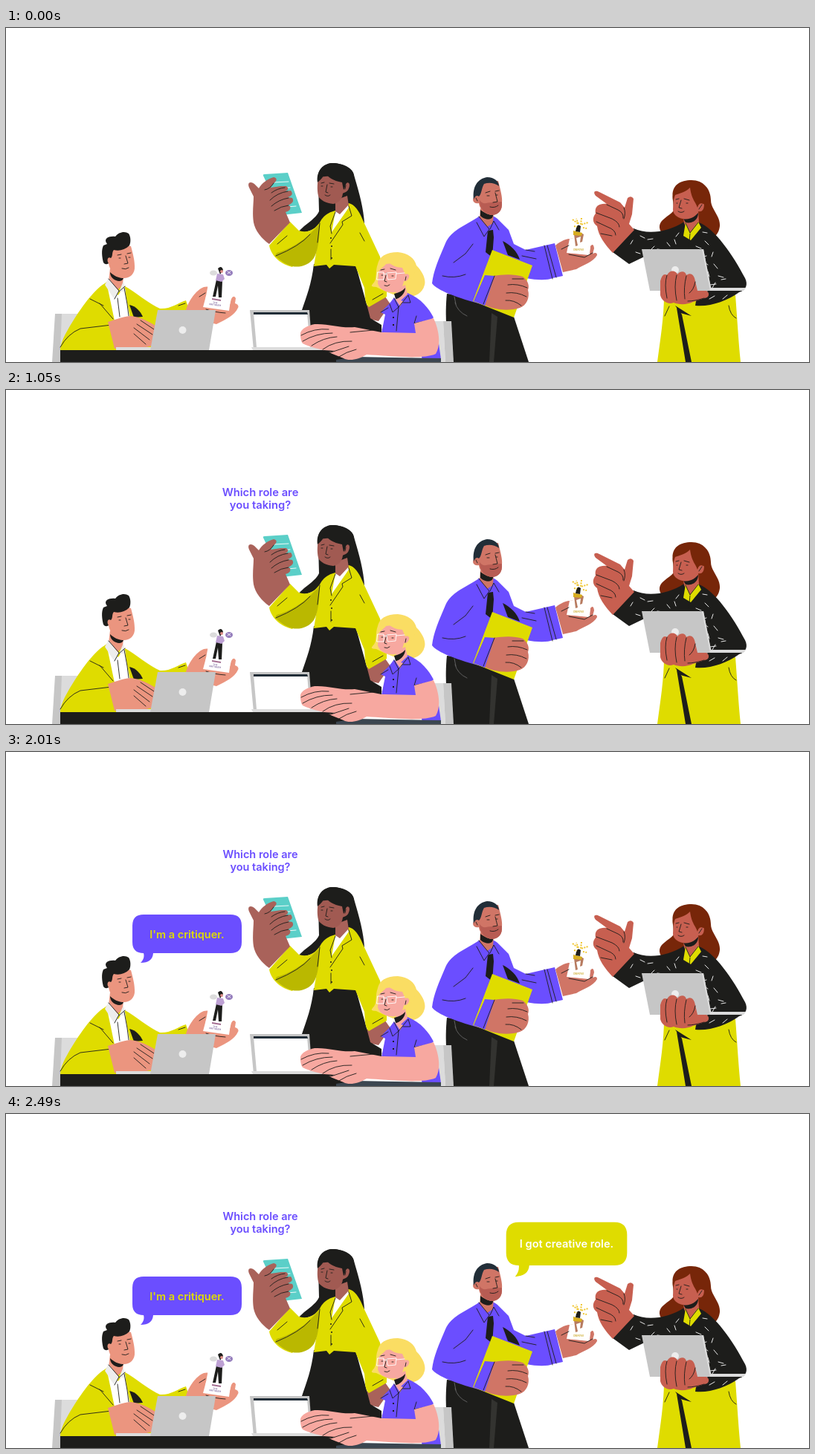
Write an HTML page that moves like this. It is 1080x450 px and loops after 2.94 s.

```html
<!DOCTYPE html>
<html lang="en">
<head>
<meta charset="utf-8">
<title>Choosing roles</title>
<style>
html, body { margin: 0; width: 100%; height: 100%; overflow: hidden; background: #fff; }
svg { display: block; width: 100%; height: 100%; }
text { font: 600 14.5px Inter, sans-serif; text-anchor: middle; }
.tiny { font-size: 3px; }
.yellow { fill: #dfdc00; } .olive { fill: #bab800; } .purple { fill: #6b4eff; }
.black { fill: #1d1d1b; } .white { fill: #fff; } .navy { fill: #222e38; }
.grey { fill: #c6c6c6; } .pale { fill: #dcdcdc; } .mist { fill: #ededed; }
.peach { fill: #eb957f; } .brown { fill: #a9625a; } .umber { fill: #a15a52; }
.pink { fill: #f7a8a0; } .clay { fill: #d07566; } .brick { fill: #c75f50; }
.teal { fill: #5bcfc8; } .blonde { fill: #fadd63; } .auburn { fill: #772609; }
.line { fill: none; stroke: #1d1d1b; stroke-width: .9; stroke-linecap: round; stroke-linejoin: round; }
.light { stroke: #fff; }
.soft { stroke: #666; }
</style>
</head>
<body>
<svg viewBox="0 0 1080 450">

<g id="standing-woman">
  <path class="black" d="M420 207C417 191 428 181 441 182C456 183 467 190 468 198C473 216 481 240 482 264L450 258L428 258C418 272 404 276 392 276C402 264 416 258 421 247Z"/>
  <path class="brown" d="M484 374L510 362L517 372L501 395L488 392Z"/>
  <path class="black" d="M414 318H470L485 372L490 391L505 400V414H398V380C404 362 411 345 414 318Z"/>
  <path class="yellow" d="M443 246L461 236C470 238 476 249 480 259L503 308L512 345V362L488 376C482 371 483 358 482 350L470 321L441 319L435 324L431 319L414 321L420 285L385 322C372 319 357 309 354 293L382 261L394 273C408 277 416 270 422 262C427 252 435 248 443 246Z"/>
  <path class="olive" d="M364 303C380 299 399 287 409 277L422 264C421 285 420 300 414 310C407 320 395 323 385 321C376 319 369 313 362 307Z"/>
  <path class="brown" d="M443 232L459 226L461 239L448 253L443 248Z"/>
  <path class="white" d="M443 247L449 251L460 239L461 242L438 275Z"/>
  <path class="umber" d="M420 201L449 198L456 211C460 205 464 210 461 216C459 222 455 221 453 223C452 231 447 236 440 237C431 236 422 232 420 226C418 217 419 208 420 201Z"/>
  <path class="black" d="M419 208C417 194 425 184 438 182C455 182 467 190 468 199C466 204 466 208 461 207C456 207 457 215 454 218L452 208C440 206 433 201 429 195C427 200 424 204 419 208Z"/>
  <path class="line" d="M424 209l4-1M435 209l6 1M432 211L430 221L433 222M429 225Q433 228 436 225M424 213h2M437 214h2M457 212L456 217"/>
  <path class="line" d="M461 240L465 253L452 261L453 265L436 290M443 248L436 267L438 277M422 263L419 289M363 307Q395 294 409 278M365 291L378 280M476 276L482 287M493 366L507 358M437 298v14"/>
  <path class="black" d="M436 283a1 1 0 102 0a1 1 0 10-2 0M437 294a1 1 0 102 0a1 1 0 10-2 0M437 310a1 1 0 102 0a1 1 0 10-2 0"/>
  <path class="teal" d="M346 199Q345 197 348 197L379 195L398 249L371 252Z"/>
  <path class="line light" d="M360 208L380 207M365 216L382 215M378 241L390 240"/>
  <path class="brown" d="M354 291C344 284 335 273 333 262C331 250 333 236 333 227L327 215C324 208 329 206 334 210L340 216C344 209 352 203 360 201C366 202 364 207 359 210L356 215L370 213L377 213Q382 217 376 220L383 219Q388 225 379 228L385 229Q389 235 379 239L382 240Q384 246 376 248L382 262Z"/>
  <path class="line" d="M348 218Q355 217 360 209M355 232Q365 222 379 220M357 240Q367 231 380 229M361 246Q370 240 380 239M357 222Q365 216 375 215"/>
</g>

<g id="seated-man">
  <path class="grey" d="M66 385H76L73 450H62Z"/>
  <path class="pale" d="M75 385H110V434H73Z"/>
  <path class="yellow" d="M73 434C73 427 77 417 84 405C97 383 116 354 133 344L139 339L160 348C173 355 193 372 207 378C221 379 230 371 242 367L247 382L215 400L199 434Z"/>
  <path class="white" d="M135 342L151 360L159 347L163 370L167 391L162 404H148Z"/>
  <path class="black" d="M166 373C175 375 181 382 184 389L172 390Z"/>
  <path class="peach" d="M140 324L158 334L157 346L150 353L138 341Z"/>
  <path class="black" d="M140 329C145 334 152 337 158 337C157 341 152 342 148 340C143 338 140 334 140 329Z"/>
  <path class="mist" d="M138 337L152 355L146 366L133 346ZM158 341L161 355L152 355Z"/>
  <path class="line" d="M138 338L152 354L146 365M152 355L160 348M150 364L153 389M159 350L163 372L165 388M113 365L131 374M126 371L144 392M73 430Q83 412 100 405L142 400M232 374L241 371"/>
  <path class="peach" d="M142 298C150 291 160 292 168 294C171 305 173 313 173 321C174 332 165 338 157 337C147 335 139 326 138 317C132 320 130 309 136 307Z"/>
  <path class="black" d="M131 316C129 308 128 299 131 293L136 291C131 285 136 280 147 281C151 275 160 273 165 277C168 281 168 289 166 293C160 299 152 301 145 299C142 302 144 308 141 310C137 307 135 313 138 317Q134 320 131 316Z"/>
  <path class="line" d="M150 306L155 305M163 304L168 303M161 307L164 317L159 318M156 324Q161 326 165 323M152 310h2M165 309h2"/>
  <path class="peach" d="M137 396C150 392 160 388 168 388C180 389 193 396 201 401L196 428C188 432 167 432 146 432Z"/>
  <path class="line" d="M181 394L199 406M176 399L197 413M172 404L193 420M172 412L188 426"/>
  <path class="peach" d="M242 380C245 369 253 357 262 351C268 347 277 348 275 353L269 361L267 373L299 380L303 365Q306 359 309 364L308 371Q314 373 312 377C308 387 295 393 283 399L246 390Z"/>
  <path class="white" d="M269 361L274 334L306 338L300 381L265 376Z"/>
  <path class="line" d="M269 379Q280 383 295 384M260 362L268 357"/>
  <path fill="#a46d91" d="M277 364L289 366V368L277 366Z"/>
  <path class="black" d="M283 339L291 341L290 363H286L285 347L282 362H278ZM285 324Q290 319 292 326L288 332Z"/>
  <path fill="#bda0d3" d="M284 331L292 332L294 338L290 342L282 340Z"/>
  <circle cx="290" cy="328" r="2" fill="#dc8d87"/>
  <ellipse class="pale" cx="279" cy="330" rx="5" ry="3.5"/>
  <ellipse cx="300" cy="330" rx="5" ry="4" fill="#937bbb"/>
  <path class="line light" d="M298 328l4 3m0-3l-4 3"/>
  <g transform="rotate(7 281 373)" fill="#7b629a"><text class="tiny" x="281" y="371">THE</text><text class="tiny" x="281" y="374">CRITIQUER</text></g>
</g>

<g id="folder-man">
  <path class="black" d="M593 358L664 365L682 386L703 450H601C592 425 590 385 593 358Z"/>
  <path fill="#333330" d="M653 384L661 389L656 450H650Z"/>
  <path class="line soft" d="M604 370Q607 382 620 388M605 372L603 362"/>
  <path class="purple" d="M633 256C618 266 599 272 591 290C582 311 575 327 573 344C579 353 607 364 643 373L658 345L700 337C714 340 729 340 735 337L749 334L738 290L699 299L683 291L676 272L661 257C652 250 641 250 633 256Z"/>
  <path class="clay" d="M638 243L656 248L655 263L647 268L637 257Z"/>
  <path class="black" d="M638 245C643 249 650 252 655 252C655 259 645 260 638 253ZM648 273L655 272L656 282L654 309L645 302ZM668 287C678 292 688 301 691 312L675 306Z"/>
  <path class="purple" d="M636 254L650 272L643 282L633 262ZM656 257L663 271L652 269Z"/>
  <path class="line" d="M636 254L650 271L643 281L633 262M651 271L656 260L663 272M602 316L618 304L628 291M587 334Q603 338 618 332M694 307L713 311M699 299L711 301M724 293L735 338M728 293L740 336"/>
  <path class="clay" d="M638 207L662 206C665 218 668 229 667 235C668 247 661 252 653 252C644 251 637 244 636 236C628 238 625 229 632 226Z"/>
  <path fill="#b85c53" d="M637 232C642 239 646 235 654 235L667 234C668 246 662 252 653 252C643 250 637 243 637 232Z"/>
  <path class="navy" d="M629 231C627 214 634 203 647 201C657 201 663 207 663 213C656 208 649 208 643 210C639 217 640 223 636 227Q632 224 629 231Z"/>
  <path class="line" d="M645 222L651 220M658 220L663 219M658 222L661 234L655 235M651 241Q657 243 662 239M647 226h3M659 225h2M632 229l2 4"/>
  <path class="yellow" d="M654 299L708 320L683 390L628 368Z"/>
  <path class="clay" d="M656 334C668 332 683 331 695 335C703 341 704 348 702 353C705 363 700 374 691 377C676 382 656 380 641 372Z"/>
  <path class="purple" d="M644 333L657 334L644 374L629 368Z"/>
  <path class="line" d="M657 334L642 372M675 346Q688 344 701 350M673 357Q687 355 700 362M672 367Q683 366 693 374M681 338L696 338"/>
  <path class="clay" d="M739 293C748 285 760 282 767 285L765 293L756 303L784 306L786 294Q790 289 791 297L789 304Q795 301 795 306C790 315 777 319 767 325L749 329Z"/>
  <path class="white" d="M758 284L787 282L785 305L754 303Z"/>
  <path class="line" d="M757 305L778 309L789 303M747 298L757 293"/>
  <path fill="#b77b60" d="M771 275L777 278L775 288L772 289L773 281L767 283L769 293L766 294L764 278Z"/>
  <path fill="#d7ad20" d="M763 273L775 276L774 280L763 279Z"/>
  <path class="black" d="M767 269Q769 263 773 267L772 275L766 274Z"/>
  <path fill="none" stroke="#efc52d" stroke-width="2" stroke-dasharray="2 1.4" d="M762 258L770 264L767 257M774 256L773 265L783 262M764 267L768 268M776 269L781 270"/>
  <text class="tiny" x="770" y="300" fill="#c9a51d">CREATIVE</text>
</g>

<g id="blonde-woman">
  <path class="pale" d="M570 395H588L591 450H572Z"/>
  <path class="grey" d="M588 395H599L602 450H591Z"/>
  <path class="blonde" d="M498 349Q489 349 493 345C500 339 496 328 500 318C503 306 514 302 527 302C541 303 550 311 552 320C560 328 565 338 563 346C560 358 550 362 541 362C529 364 514 357 498 349Z"/>
  <path class="purple" d="M521 366L540 357C558 364 569 378 575 390L568 397L582 425L585 446L560 447L551 411H505L510 386L504 383Z"/>
  <path class="pink" d="M525 352L537 346L540 359L530 375L524 366Z"/>
  <path class="black" d="M522 358Q532 356 537 350C537 358 529 365 524 365Z"/>
  <path class="pink" d="M502 319L530 316L537 330Q544 327 542 336Q540 342 535 341C534 352 526 357 518 356C508 355 502 351 500 344Z"/>
  <path class="blonde" d="M499 329C500 311 509 304 522 303C542 305 552 315 552 325L545 340Q542 329 537 332L533 323Q520 322 514 315Q508 322 499 329Z"/>
  <path class="line" d="M504 326L509 325M517 324L524 326M512 330L509 341L512 342M509 347Q513 349 516 346M505 333h2M519 334h2M538 335l-1 5"/>
  <path class="line light" d="M500 329H508L508 339H499ZM512 330L525 329L524 338L514 339ZM508 331L512 332M525 331L536 330"/>
  <path class="purple" d="M522 363L528 377L520 384L516 371ZM541 358L544 371L531 367Z"/>
  <path class="line" d="M522 364L528 376L520 383L516 372M528 376L541 360L544 370L534 370M528 376L525 408M504 383L514 377M552 388L549 398L569 394"/>
  <path class="black" d="M520 389h2v2h-2zM520 399h2v2h-2z"/>
  <path class="black" d="M73 434H470V450H73Z"/>
  <path fill="#3b4650" d="M444 447L470 443L585 445V450H444Z"/>
  <path class="grey" d="M328 380H408L412 434H333Z"/>
  <path class="white" d="M333 384H405L409 430H337Z"/>
  <path class="navy" d="M333 383H405L406 386H333Z"/>
  <path class="pale" d="M330 430H438V434H332Z"/>
  <path class="pink" d="M396 411C397 405 406 401 415 399C435 398 450 405 469 403L505 410L551 411L549 398L575 391C583 408 585 427 578 439C561 447 517 442 485 440C474 447 461 449 454 445L434 437L443 435L427 434C416 431 409 430 399 425C396 421 396 415 396 411Z"/>
  <path class="line" d="M397 414Q415 404 434 406M399 422Q417 411 439 411M411 428Q427 417 445 416M426 433Q442 421 465 422M434 438L461 429M446 444Q458 436 471 433M463 410L505 406"/>
</g>

<g id="left-laptop">
  <path class="pale" d="M148 430H195V434H148Z"/>
  <path class="grey" d="M204 380H282L273 434H194Z"/>
  <circle class="mist" cx="237.5" cy="407" r="5"/>
</g>

<g id="pointing-woman">
  <path class="yellow" d="M885 360H981C983 385 985 421 988 450H876C880 420 885 389 885 360Z"/>
  <path class="black" d="M902 377L909 386L922 450H914ZM900 374L922 388L907 384Z"/>
  <path class="line" d="M972 374Q974 387 982 391M892 375L886 388"/>
  <path class="auburn" d="M897 231C894 213 905 205 922 205C938 205 948 217 948 232C948 244 961 253 960 267C958 283 946 287 930 286C905 287 881 284 879 269C878 258 892 254 898 246Z"/>
  <path class="black" d="M912 261L932 262C953 270 978 306 994 337C998 345 996 353 986 356C969 368 947 376 927 374L929 362L885 361L871 302L838 318L816 302L844 270C863 279 891 275 912 261Z"/>
  <path class="line light" d="M853 280l6 3m-19 8l3-5m4 16l6 2m10-19l7-1m-3 15l5-5m17-5l4 5m-17 4l8 1m15-14l2 6m-28 8l5 2m50-7l7 3m-7 9l2-7m10-12l5 5m-10 17l7-2m9-5l-2 6m-11 7l6 4m8-1l5 6m-13 4l2 7m12-1l7 2m-24 10l7 3m6-6l-4 7m12-11l6-1m-28 17l6-2M905 276l-4 5m36-6l6 1m4 70l8-1m-9 20l7-4m11 4l6-5"/>
  <path class="brick" d="M910 250L931 245L932 262L920 277L912 263Z"/>
  <path class="black" d="M911 257Q924 257 931 249C931 260 921 264 914 262Z"/>
  <path class="yellow" d="M914 262L920 276L931 261L935 269L921 286L911 280Z"/>
  <path class="line" d="M914 263L920 276L931 262M920 277L918 298"/>
  <path class="brick" d="M899 222L922 214L930 239Q938 231 939 239Q938 249 931 247C928 255 918 259 910 257C901 255 897 250 897 244Z"/>
  <path class="auburn" d="M897 233C895 216 907 206 920 206C937 206 948 218 947 234L938 237Q932 234 930 242C928 235 922 231 920 215C915 221 905 223 900 225Z"/>
  <path class="line" d="M901 231L905 230M912 230L919 232M908 232L905 242L909 243M904 247Q908 250 912 247M902 236h1M915 236h2M936 238L932 244"/>
  <path class="brick" d="M816 303C805 291 797 280 795 267C789 263 788 256 793 250C791 241 797 236 808 237L793 226C789 221 792 218 798 221L826 235L832 242L836 229Q841 225 844 230L842 251L838 264L845 272Z"/>
  <path class="line" d="M808 238L823 245Q831 249 830 256M794 249L815 257Q825 262 825 268M794 261L809 268Q820 272 820 279M800 277L815 280M831 242Q834 249 831 257"/>
  <path class="grey" d="M855 298H938L949 354H866Z"/>
  <path class="pale" d="M938 298L948 350H995L992 354H947L936 299Z"/>
  <circle class="mist" cx="900" cy="326" r="5"/>
  <path class="brick" d="M880 341Q883 329 889 333C893 325 901 327 903 332C908 326 914 328 915 333C922 328 926 334 927 341L930 354H942Q948 358 943 363L924 369C916 373 905 373 898 370C890 373 882 368 880 360Z"/>
  <path class="line" d="M889 333Q885 345 889 364M902 333Q898 348 902 367M915 334Q911 350 913 365M927 342Q925 353 919 357M917 368Q926 368 939 364"/>
</g>

<g id="question" class="purple">
  <text x="342" y="143">Which role are</text>
  <text x="342" y="160">you taking?</text>
</g>
<g id="critic">
  <path class="purple" d="M185 219H302Q317 219 317 234V256Q317 271 302 271H198Q197 284 181 284Q187 278 185 271Q170 271 170 256V234Q170 219 185 219Z"/>
  <text class="yellow" x="243.5" y="251">I'm a critiquer.</text>
</g>
<g id="creative">
  <path class="yellow" d="M690 146H818Q835 146 835 163V187Q835 204 818 204H704Q703 218 685 219Q691 212 690 204Q673 204 673 187V163Q673 146 690 146Z"/>
  <text class="white" x="754" y="180">I got creative role.</text>
</g>
</svg>

<script>
const LOOP = 2940, POP = 390;
const pops = [
  { id: "question", start: 702, x: 342, y: 147 },
  { id: "critic", start: 1428, x: 243.5, y: 251.5 },
  { id: "creative", start: 2120, x: 754, y: 182.5 },
];

function backOut(p) {
  const u = p - 1;
  return 1 + 2.8 * u ** 3 + 1.8 * u ** 2;
}

function draw(now) {
  const time = now % LOOP;
  for (const { id, start, x, y } of pops) {
    const progress = Math.min(1, Math.max(0, (time - start) / POP));
    const group = document.getElementById(id);
    group.style.display = progress > 0 ? "" : "none";
    group.setAttribute("transform", `translate(${x} ${y}) scale(${backOut(progress)}) translate(${-x} ${-y})`);
  }
  requestAnimationFrame(draw);
}
draw(performance.now());
</script>
</body>
</html>
```
